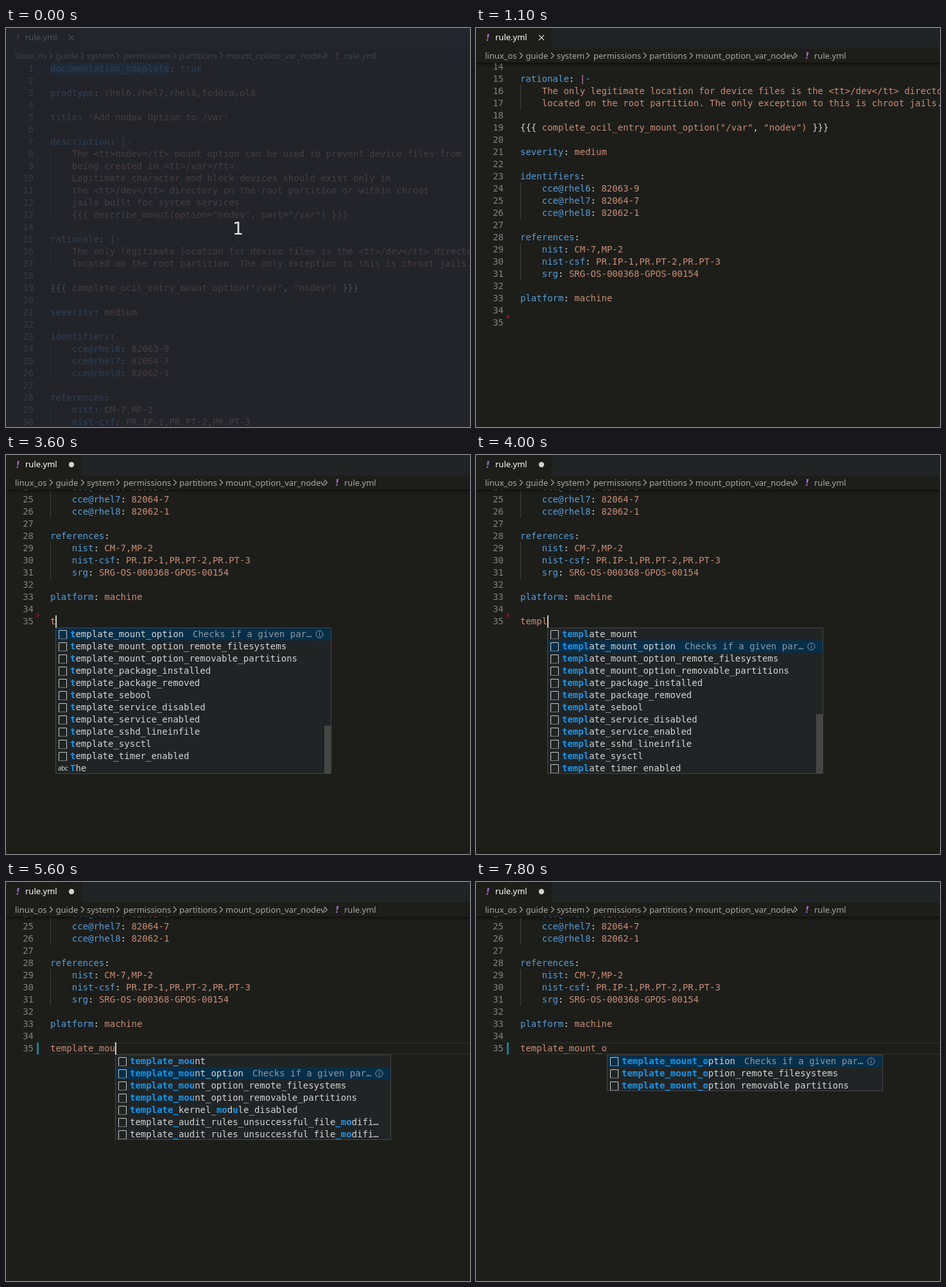
An HTML page that plays this animation: 723x622 px, repeating every 8000 ms.

```html
<!DOCTYPE html>
<html lang="en">
<head>
<meta charset="utf-8">
<title>Editor</title>
<style>
  :root { --bg: #1d1e1a; --panel: #212425; --key: #569cd6; --str: #c98d76; --text: #d4d4d4; }
  html, body { margin: 0; width: 100%; height: 100%; overflow: hidden; background: var(--bg); }
  #stage { position: relative; width: 723px; height: 622px; overflow: hidden; background: var(--bg); }
  #stage div, #stage svg { position: absolute; }
  .ui { font: 13px "Noto Sans", "Open Sans", sans-serif; white-space: pre; }
  .mono { font: 14px/19px "DejaVu Sans Mono", monospace; white-space: pre; color: var(--text); }
  #strip { left: 118px; top: 0; width: 605px; height: 32px; background: var(--panel); }
  #tab { left: 30px; top: -3px; line-height: 35px; color: #fff; }
  .crumb { top: 32px; line-height: 22px; color: #a8a8a6; }
  #icons { left: 0; top: 0; }
  #editor { left: 0; top: 54px; width: 723px; height: 568px; overflow: hidden; }
  #shade { left: 0; top: 0; width: 723px; height: 6px; box-shadow: #000 0 6px 6px -6px inset; }
  #lines { left: 0; top: 0; width: 723px; height: 665px; }
  .row { left: 69px; height: 19px; }
  .num { left: 0; width: 43px; text-align: right; color: #80817d; }
  .guide { left: 69px; width: 1px; height: 19px; background: #404040; }
  .active { left: 69px; width: 654px; height: 19px; box-sizing: border-box; border: solid #272724; border-width: 2px 0; }
  #word { left: 69px; top: 0; width: 185px; height: 19px; background: #083c5b; }
  #cut { left: 48px; top: 642px; border: solid transparent; border-width: 4px 0 4px 5px; border-left-color: #86102a; }
  #bar { left: 48px; top: 646px; width: 3px; height: 19px; background: #1b8090; }
  #caret { top: 646px; width: 2px; height: 19px; background: #c8c8c4; }
  .k { color: var(--key); } .s { color: var(--str); } .p { color: #c586c0; }
  #popup { top: 269px; width: 430px; box-sizing: border-box; border: 1px solid #454545; background: var(--panel); overflow: hidden; }
  .item { left: 0; width: 428px; height: 19px; }
  .item.on { background: #062f4a; }
  .item b { color: #1297ee; }
  .label { left: 22px; top: 0; }
  .detail { top: 0; opacity: .65; }
  .abc { left: 3px; top: 0; font: 10px/19px "Noto Sans", sans-serif; letter-spacing: -.4px; }
  .thumb { left: 418px; width: 10px; background: #464646; }
  #dim { left: 0; top: 0; width: 723px; height: 622px; background: rgba(36, 39, 48, .79); }
  #count { left: 0; top: 297px; width: 723px; text-align: center; font: 27px/31px "DejaVu Sans", sans-serif; color: #e6e6e6; }
</style>
</head>
<body>
<div id="stage">
  <div id="editor">
    <div id="lines"></div>
    <div id="shade"></div>
  </div>
  <div id="strip"></div>
  <div id="tab" class="ui">rule.yml</div>
  <svg id="icons" width="723" height="54" fill="none" stroke-width="1.1">
    <defs><path id="bang" d="M17.6 9.5h3.3l-1.8 6.8h-1.6zM16.9 17.6h2.2l-.4 2.3h-2.2z" fill="#a468c8"/></defs>
    <use href="#bang"/><use href="#bang" x="497.5" y="28"/>
    <path id="close" d="M98 11l8 8M106 11l-8 8" stroke="#d6d6d6"/>
    <circle id="dirty" cx="102" cy="15" r="4.2" fill="#d0d0cc"/>
    <path id="chevrons" stroke="#a8a8a6"/>
  </svg>
  <div id="popup" class="mono"></div>
  <div id="dim"><div id="count">1</div></div>
</div>
<script>
const $ = id => document.getElementById(id);
const LOOP = 8000, CHAR = 14 * 0.60205, LEFT = 69, ROW = 19;
const WORD = 'template_mount_o';

const source = `documentation_complete: true

prodtype: rhel6,rhel7,rhel8,fedora,ol8

title: 'Add nodev Option to /var'

description: |-
    The <tt>nodev</tt> mount option can be used to prevent device files from
    being created in <tt>/var</tt>.
    Legitimate character and block devices should exist only in
    the <tt>/dev</tt> directory on the root partition or within chroot
    jails built for system services.
    {{{ describe_mount(option="nodev", part="/var") }}}

rationale: |-
    The only legitimate location for device files is the <tt>/dev</tt> directory
    located on the root partition. The only exception to this is chroot jails.

{{{ complete_ocil_entry_mount_option("/var", "nodev") }}}

severity: medium

identifiers:
    cce@rhel6: 82063-9
    cce@rhel7: 82064-7
    cce@rhel8: 82062-1

references:
    nist: CM-7,MP-2
    nist-csf: PR.IP-1,PR.PT-2,PR.PT-3
    srg: SRG-OS-000368-GPOS-00154

platform: machine

`.split('\n');

// Time steps: [ms, value]
const scrolls = [[0, 0], [700, 100], [800, 200], [1100, 250], [1200, 300], [1300, 350], [1500, 400], [1600, 450]];
const typing = [[0, 0], [3600, 1], [3700, 2], [3800, 3], [4000, 5], [4200, 6], [4300, 7], [4400, 8],
  [4800, 9], [5100, 11], [5600, 12], [5800, 13], [6000, 14], [6900, 15], [7200, 16]];
const blinks = [[0, 0], [2300, 1], [2700, 0], [3200, 1], [6500, 0], [6900, 1], [7800, 0]];

const mounts = ['mount', 'mount_option', 'mount_option_remote_filesystems', 'mount_option_removable_partitions'];
const others = ['package_installed', 'package_removed', 'sebool', 'service_disabled', 'service_enabled',
  'sshd_lineinfile', 'sysctl', 'timer_enabled'];
const change = 'audit_rules_unsuccessful_file_modification';
const truncWrite = change + '_o_trunc_write', ruleOrder = change + '_rule_order';

function valueAt(steps, t) {
  let v = steps[0][1];
  for (const [at, next] of steps) if (t >= at) v = next;
  return v;
}

const esc = s => s.replace(/&/g, '&amp;').replace(/</g, '&lt;');
const span = (c, s) => `<span class="${c}">${esc(s)}</span>`;

function paint(line) {
  if (line.startsWith('{{{'))
    return line.split(/(\{\{\{|\}\}\}|,)/).map(s => /^[{},]/.test(s) ? s : span('s', s)).join('');
  const m = line.match(/^(\s*)([\w@-]+):(.*)$/);
  if (!m) return span('s', line);
  const value = m[3] === ' |-' ? ' ' + span('p', '|') + span('k', '-')
    : span(m[3] === ' true' ? 'k' : 's', m[3]);
  return m[1] + span('k', m[2]) + ':' + value;
}

function buildEditor() {
  let html = '<div class="active" id="top" style="top:0"></div><div id="word"></div>'
    + `<div class="active" id="end" style="top:${34 * ROW}px"></div>`;
  source.forEach((line, i) => {
    const top = `style="top:${i * ROW}px"`;
    html += `<div class="mono num" ${top}>${i + 1}</div>`;
    if (line.startsWith('    ')) html += `<div class="guide" ${top}></div>`;
    html += `<div class="mono row" ${top}>${paint(line)}</div>`;
  });
  html += `<div class="mono row s" id="typed" style="top:${34 * ROW}px"></div>`;
  $('lines').innerHTML = html + '<div id="cut"></div><div id="bar"></div><div id="caret"></div>';
}

function buildCrumbs() {
  const crumbs = [['linux_os', 14], ['guide', 77.5], ['system', 126], ['permissions', 183],
    ['partitions', 270], ['mount_option_var_nodev', 342], ['rule.yml', 527]];
  for (const [text, x] of crumbs) {
    const el = document.createElement('div');
    el.className = 'ui crumb';
    el.textContent = text;
    el.style.left = x + 'px';
    $('stage').insertBefore(el, $('icons'));
  }
  $('chevrons').setAttribute('d',
    [68, 117, 172, 261, 333, 496].map(x => `M${x} 38.5l4.5 4.5l-4.5 4.5`).join(''));
}

function choices(n) {
  if (n < 2) return [...mounts.slice(1), ...others, 'The'];
  if (n < 10) return [...mounts, ...others];
  if (n === 11) return [...mounts, 'kernel_module_disabled', 'package_removed', 'audit_rules_dac_modification',
    change, change + '_o_creat', truncWrite, ruleOrder, 'audit_rules_usergroup_modification'];
  if (n === 12) return [...mounts, 'kernel_module_disabled', truncWrite, ruleOrder];
  if (n < 15) return [...mounts, truncWrite];
  return mounts.slice(1);
}

// Indices of the letters in the label that match the typed word
function matches(label, word) {
  const hits = new Set();
  if (label.includes('audit')) {
    const at = label.indexOf('_mo');
    return hits.add(8).add(at).add(at + 1).add(at + 2);
  }
  let from = 0;
  for (const c of word) {
    const at = label.toLowerCase().indexOf(c, from);
    if (at < 0) break;
    hits.add(at);
    from = at + 1;
  }
  return hits;
}

function mark(label, word) {
  const hits = matches(label, word);
  const shown = label.length > 46 ? label.slice(0, 45) + '…' : label;
  return [...shown].map((c, i) => hits.has(i) ? `<b>${c}</b>` : c).join('').replace(/<\/b><b>/g, '');
}

const snippet = `<svg style="left:4px;top:3px" width="14" height="15" fill="none" stroke="#c8c8c4">
  <path d="M.5 13V.5h12V13"/><path d="M0 13.5h14" stroke-dasharray="1 1"/></svg>`;
const info = `<svg style="left:404px;top:3px" width="13" height="13" fill="none" stroke="#8fa0ac">
  <circle cx="6.5" cy="6.5" r="5.5"/><path d="M6.5 5.5v4M6.5 3v1.3"/></svg>`;

function item(name, i, word) {
  const plain = name === 'The', label = plain ? name : 'template_' + name;
  const on = name === 'mount_option';
  const icon = plain ? '<div class="abc">abc</div>' : snippet;
  const detail = on ? `<div class="detail" style="left:${22 + label.length * CHAR + 14}px">Checks if a given par…</div>${info}` : '';
  return `<div class="item${on ? ' on' : ''}" style="top:${i * ROW}px">${icon}`
    + `<div class="label">${mark(label, word)}</div>${detail}</div>`;
}

function fillPopup(n) {
  const list = choices(n), thumb = n < 2 ? 74 : 92;
  let html = list.map((name, i) => item(name, i, WORD.slice(0, n))).join('');
  if (n < 10) html += `<div class="thumb" style="top:${226 - thumb}px;height:${thumb}px"></div>`;
  $('popup').innerHTML = html;
  $('popup').style.left = Math.round(LEFT + n * CHAR) + 'px';
  $('popup').style.height = list.length * ROW + 'px';
  $('typed').textContent = WORD.slice(0, n);
  $('caret').style.left = Math.floor(LEFT + n * CHAR) + 'px';
}

const show = (id, on) => { $(id).style.display = on ? '' : 'none'; };
let shownCount = -1;

function draw(t) {
  const n = valueAt(typing, t), scroll = valueAt(scrolls, t);
  if (n !== shownCount) fillPopup(shownCount = n);
  $('lines').style.top = -scroll + 'px';
  show('shade', scroll > 0);
  show('dim', t < 100);
  show('caret', valueAt(blinks, t));
  show('popup', t >= 3300);
  show('close', n === 0);
  show('dirty', n > 0);
  show('cut', t < 4700);
  show('bar', t >= 4700);
  show('end', t >= 4700);
}

buildEditor();
buildCrumbs();
draw(0);
const start = performance.now();
requestAnimationFrame(function tick() {
  draw((performance.now() - start) % LOOP);
  requestAnimationFrame(tick);
});
</script>
</body>
</html>
```
